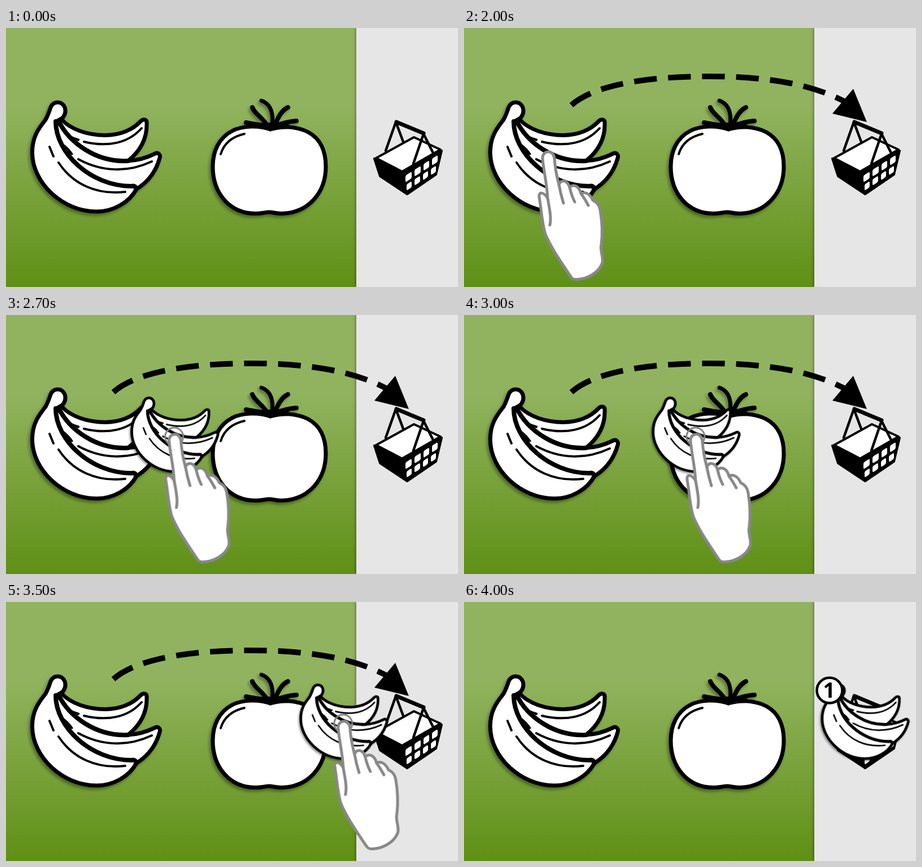
Recreate the animation shown at these times as an HTML page. Size 800x460 px, loop 6000 ms.

```html
<!DOCTYPE html>
<html lang="en">
<head>
<meta charset="utf-8">
<title>Drag to basket</title>
<style>
html, body { margin: 0; width: 100%; height: 100%; overflow: hidden; }
body { position: relative; background: linear-gradient(#91b35f 0%, #91b35f 30%, #5f9015 100%); }
.panel {
  position: absolute; left: 620px; top: 0; right: 0; height: 100%;
  background: #e6e6e6; box-shadow: -1px 0 5px rgba(0, 0, 0, .4);
}
svg { position: absolute; left: 0; top: 0; width: 800px; height: 460px; display: block; }
path { stroke-linecap: round; stroke-linejoin: round; }
.edge { fill: none; stroke: #000; }
.body { fill: #fff; stroke: #000; stroke-width: 7; }
.shade { filter: drop-shadow(-3px 4px 2.5px rgba(0, 0, 0, .35)); }
.skin { fill: #fff; stroke: #888; stroke-width: 5; }
.crease { fill: none; stroke: #888; stroke-width: 5; }

.arrow, .hand, .ring, .clone, .badge { opacity: 0; animation: 6s step-end infinite; }
.arrow { animation-name: arrow; }
.hand { animation-name: hand; }
.ring { animation-name: ring; }
.clone { animation-name: clone; }
.badge { animation-name: badge; }
.drag { animation: drag 6s linear infinite; }

@keyframes arrow {
  0%, 66.666% { opacity: 0; }
  16.666% { opacity: 1; }
}
@keyframes hand {
  0% { opacity: 0; transform: translateY(8px); }
  33.333% { opacity: 1; transform: translateY(8px); }
  35% { opacity: 1; transform: translateY(4px); }
  36.666% { opacity: 1; transform: none; }
  66.666%, 100% { opacity: 0; transform: none; }
}
@keyframes ring {
  0%, 65% { opacity: 0; }
  36.666% { opacity: 1; }
}
@keyframes clone {
  0% { opacity: 0; }
  38.333%, 100% { opacity: 1; }
}
@keyframes badge {
  0% { opacity: 0; }
  66.666%, 100% { opacity: 1; }
}
@keyframes drag {
  0% { transform: translateX(0); }
  38.333% { transform: translateX(0); animation-timing-function: steps(15, end); }
  63.333%, 100% { transform: translateX(561px); }
}
</style>
</head>
<body>
<div class="panel"></div>
<svg viewBox="0 0 800 460">
  <defs>
    <g id="bananas">
      <path class="body" d="M79 141C84 129 99 129 104 141C107 150 103 157 98 162
        C115 181 145 190 176 190.500C202 190 224 181 238 166C243 161 250 162 249 169
        C250 195 238 218 216 236C235 235 252 229 264 223C270 220 274 226 272 231
        C266 253 252 273 231 286C218 310 190 326 160 326C100 326 47 275 46.500 222
        C46 192 60 176 70 163C75 154 77 147 79 141Z"/>
      <path class="edge" stroke-width="8" d="M88 166C88 222 150 281 222 281Q230 279 230 287
        M93 165C112 204 160 239 216 236M90 166L99 161"/>
      <path class="edge" stroke-width="4" d="M93 239C118 277 160 297 211 291M77 211L84 228
        M128 233C170 256 216 257 258 237M138 202C180 212 216 205 240 178"/>
      <path d="M101 205Q112 213 119 224Q117 227 114 225ZM109 189Q120 194 130 197Q131 201 127 201Z"/>
    </g>
  </defs>

  <use class="shade" href="#bananas"/>

  <g class="shade">
    <path class="body" d="M468 180C448 173 418 173 400 183C377 195 366 219 366 246
      C366 294 396 329 441 329.500C452 330 460 327 466 327C472 327 478 330 489 329.500
      C536 328 566 292 566 246C566 217 555 196 535 185C515 174 488 174 468 180Z"/>
    <path class="edge" stroke-width="4" d="M380 224C386 204 400 193 422 188"/>
    <path class="edge" stroke-width="7" d="M470 178C474 158 472 136 452 129"/>
    <path class="edge" stroke-width="8" d="M436 141C441 154 452 156 463 174
      M499 141C488 146 482 158 476 172M425 168C437 171 452 171 465 176M514 165C500 166 488 169 474 175"/>
    <path d="M419 174Q445 168 463 168H476Q490 168 503 172Q486 175 474 179L468 184L462 179Q440 172 419 174Z"/>
  </g>

  <g>
    <path stroke="#000" stroke-width="4" d="M652 232L702 257L771 218L761 260L710 295L662 263Z"/>
    <path fill="#fff" stroke="#000" stroke-width="4" d="M655 231L722 194L769 216L701 255Z"/>
    <g fill="#fff" transform="translate(707 262) skewY(-32.500)">
      <rect width="11" height="12" rx="2.500"/>
      <rect x="16" width="11" height="12" rx="2.500"/>
      <rect x="32" width="10" height="12" rx="2.500"/>
      <rect x="47" width="10" height="12" rx="2.500"/>
      <rect x="2" y="17" width="9" height="11" rx="2.500"/>
      <rect x="16" y="17" width="10" height="11" rx="2.500"/>
      <rect x="31" y="17" width="9" height="11" rx="2.500"/>
      <rect x="45" y="17" width="9" height="11" rx="2.500"/>
    </g>
    <path class="edge" stroke-width="4.500" d="M672 218L690 167L703 202M721 241L739 188L756 222"/>
    <path class="edge" stroke-width="7" d="M691 167L739 187"/>
  </g>

  <g class="arrow">
    <path class="edge" style="stroke-linecap:butt" stroke-width="10" stroke-dasharray="40.200 20"
      d="M190 137C235 97 340 86 432 86C525 86 612 96 680 134"/>
    <path d="M689 108L713 167L652 152Z"/>
  </g>

  <g class="drag">
    <g class="clone">
      <use class="shade" href="#bananas" transform="translate(41.500 58.100) scale(.675)"/>
    </g>
    <circle class="ring" cx="148" cy="216" r="16" fill="none" stroke="#808080" stroke-width="3"/>
    <g class="hand">
      <path class="skin" d="M139 224C138 209 158 207 160 223C161 240 164 255 168 270
        C172 260 183 262 187 275C194 268 204 273 207 286C216 281 224 289 228 298
        Q239 303 241 315C244 333 246 352 243 376C240 390 248 399 244.500 410
        C238 427 218 438 200 438.500C194 439 191 437 188 432C172 408 155 384 144 358
        C138 339 137 314 133 292C132 283 140 282 148 294C147 270 141 246 139 224Z"/>
      <path class="crease" d="M148 294C151 312 155 328 152 342M168 270Q171 287 176 303
        M187 275Q190 289 196 301M207 286Q213 294 220 307"/>
    </g>
  </g>

  <g class="badge">
    <circle cx="647" cy="157" r="22.500" fill="#fff" stroke="#000" stroke-width="4.500"/>
    <text x="646" y="170" text-anchor="middle" font-family="'Open Sans', 'Noto Sans', sans-serif"
      font-size="37" font-weight="700">1</text>
  </g>
</svg>
</body>
</html>
```
